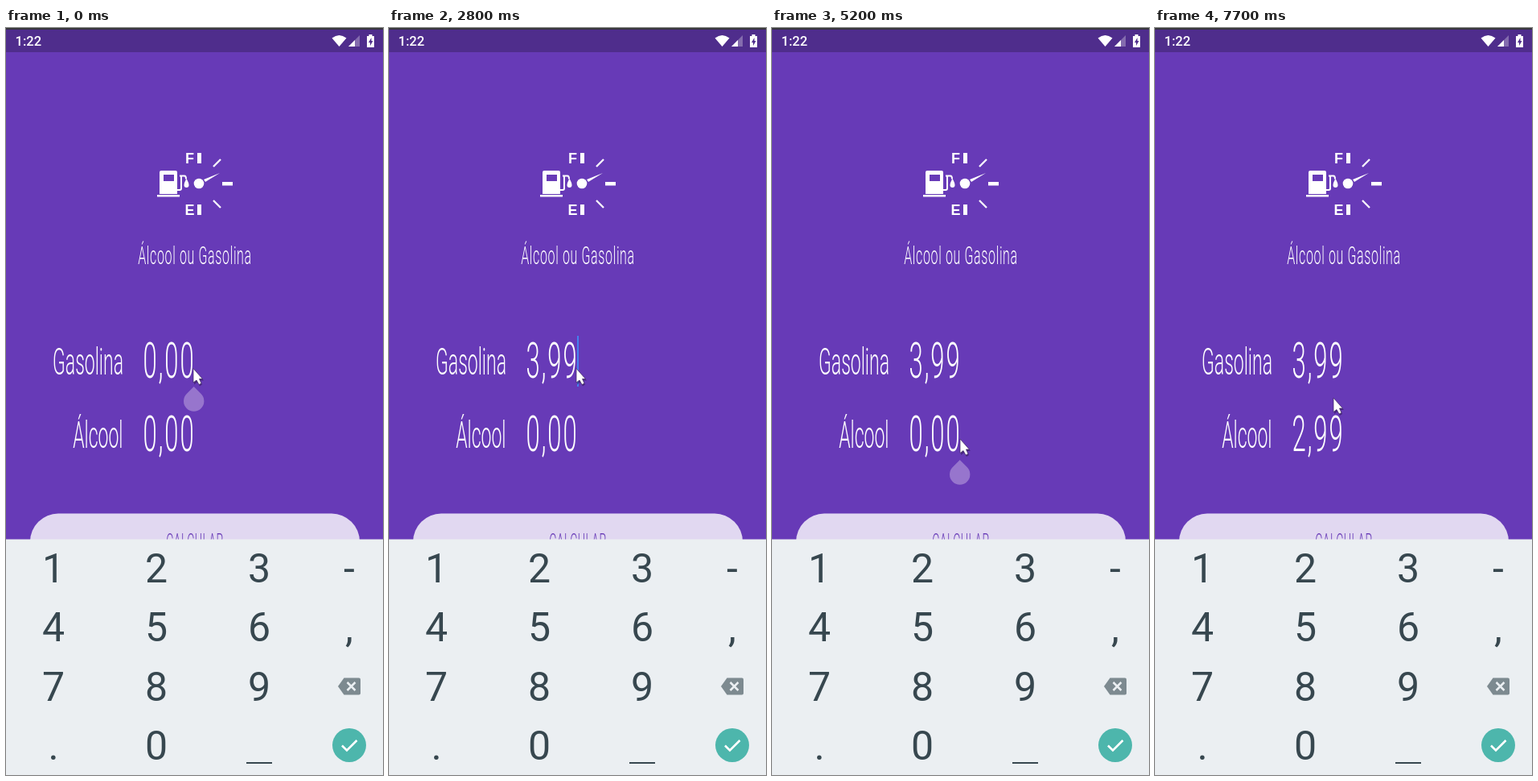
Write an HTML page that moves like this. It is 469 px wide and 927 px high and loops after 8000 ms.

```html
<!DOCTYPE html>
<html lang="pt-BR">
<head>
<meta charset="utf-8">
<style>
html, body { margin: 0; width: 100%; height: 100%; overflow: hidden; background: #673ab7; }
svg { display: block; width: 469px; height: 927px; }
text { font-family: Roboto, sans-serif; }
.thin text { font-weight: 300; fill: #fff; }
.value { font-size: 62px; letter-spacing: .06em; }
.label { font-size: 46px; text-anchor: end; }
.keys text { font-size: 50px; fill: #37474f; text-anchor: middle; }
.gauge text { font: bold 18px "Liberation Sans", sans-serif; }
</style>
</head>
<body>
<svg viewBox="0 0 469 927">
  <rect width="469" height="927" fill="#673ab7"/>
  <rect width="469" height="30" fill="#4f2d8c"/>
  <rect width="469" height="2" fill="#37363d"/>
  <g fill="#fff">
    <text x="11.500" y="22" font-size="16.500" font-weight="500">1:22</text>
    <path d="M405.500 12.500Q414.500 5.500 423.500 12.500L414.500 23Z"/>
    <path d="M426 23L440 9V23Z" opacity=".3"/>
    <path d="M426 23L434 15V23Z"/>
    <path d="M449 10h2.500V8h4v2h2.500v14h-9Z"/>
    <path d="M454.500 12l-3.500 6h2v4l3.500-6h-2Z" fill="#4f2d8c"/>
  </g>

  <g class="gauge" fill="#fff">
    <text x="223" y="168">F</text>
    <text x="222.500" y="231.500">E</text>
    <path d="M238 155h5v13h-5ZM238 219h5v13h-5ZM269 191h13v4.500h-13Z"/>
    <path d="M246 188L266 180L248 191Z"/>
    <circle cx="240" cy="193" r="6.300"/>
    <path d="M258 172l9-9M258 214l9 9" stroke="#fff" stroke-width="2.300"/>
    <path d="M193 177h18q2 0 2 2v27h-22v-27q0-2 2-2ZM188 207h28v2.500h-28Z"/>
    <rect x="196" y="182" width="13" height="8" fill="#673ab7"/>
    <path d="M213 201h3q2 0 2-2V183.500h4q2 0 2 4M216 183.500h4" fill="none" stroke="#fff" stroke-width="2"/>
    <path d="M224.500 187q3 5 3 8a3 3 0 0 1-6 0q0-3 3-8Z"/>
  </g>

  <!-- The display face is condensed to half width throughout -->
  <g class="thin">
    <text transform="translate(235 293) scale(.5 1)" font-size="32" letter-spacing=".04em" text-anchor="middle">Álcool ou Gasolina</text>
    <text class="label" transform="translate(146 429.500) scale(.5 1)">Gasolina</text>
    <text class="label" transform="translate(145.500 520.500) scale(.5 1)">Álcool</text>
    <text class="value" id="gas" transform="translate(170.500 434) scale(.5 1)"></text>
    <text class="value" id="alcohol" transform="translate(170.500 525) scale(.5 1)"></text>
    <rect x="30" y="602.500" width="410" height="70" rx="35" fill="#e1d8f1"/>
    <text transform="translate(235 647) scale(.5 1)" font-size="28" letter-spacing=".03em" text-anchor="middle" style="fill:#673ab7">CALCULAR</text>
  </g>

  <rect id="caret" x="234" width="2" height="63" fill="#4481f0"/>
  <path id="handle" d="M0 0L9 9A12.700 12.700 0 1 1-9 9Z" fill="#9775cd"/>
  <g id="pointer">
    <path d="M1 2V20L5 17L8 22L11 20L9 15H13Z" fill="#24113f" opacity=".45"/>
    <path d="M0 0V17.500L4 14.500L7 20L10 18.500L7.500 13H11.500Z" fill="#fff" stroke="#3b2560" stroke-width=".7"/>
  </g>

  <rect y="634.500" width="469" height="293" fill="#ebeff2"/>
  <g class="keys" id="keys"></g>
  <path d="M299 912h32" stroke="#37474f" stroke-width="2"/>
  <path d="M413 817l7.500-10.500h18.500q2 0 2 2v17q0 2-2 2h-18.500Z" fill="#7d8a90"/>
  <path d="M424.500 812l10 10m0-10l-10 10" stroke="#ebeff2" stroke-width="2.500"/>
  <circle cx="427" cy="890" r="21" fill="#4db6ac"/>
  <path d="M418 890.500l6 6 12.500-12.500" fill="none" stroke="#fff" stroke-width="2.600"/>
</svg>
<script>
const $ = id => document.getElementById(id);
const columns = [59, 187, 315, 427];
$('keys').innerHTML = ['123-', '456,', '789', '.0'].map((row, r) =>
  [...row].map((key, c) => `<text x="${columns[c]}" y="${688 + r * 73.4}">${key}</text>`).join('')
).join('');

const LOOP = 8000;
const blinks = [300, 800, 1200, 1700, 2800, 3000, 3600, 4100, 4700, 5100, 5700, 6100, 6500, 7600];
const gasTyping = [[0, '0,00'], [1800, '0,03'], [2100, '0,39'], [2800, '3,99']];
const alcoholTyping = [[0, '0,00'], [6500, '0,02'], [6900, '0,29'], [7300, '2,99']];
const valueAt = (steps, t) => steps.filter(step => step[0] <= t).pop()[1];

function pointerAt(t) {
  if (t < 4900) {
    const u = Math.min(1, Math.max(0, Math.floor((t - 3700) / 100) / 6));
    return [233 + 2 * u - 13 * Math.sin(Math.PI * u), 422.5 + 67.5 * u];
  }
  if (t < 5300) return [234, 510];
  return t < 5400 ? [240, 485] : [222, 459];
}

function setHandle(t) {
  const first = t < 400;
  const shown = first || (t >= 5100 && t < 6500);
  $('handle').setAttribute('transform', `translate(233.7 ${first ? 445 : 536})`);
  $('handle').setAttribute('opacity', shown ? (first && t >= 300 ? .5 : 1) : 0);
}

function draw(now) {
  const t = now % LOOP;
  $('gas').textContent = valueAt(gasTyping, t);
  $('alcohol').textContent = valueAt(alcoholTyping, t);
  $('caret').setAttribute('y', t < 4900 ? 382 : 473);
  $('caret').setAttribute('opacity', blinks.filter(b => b <= t).length % 2);
  $('pointer').setAttribute('transform', `translate(${pointerAt(t)})`);
  setHandle(t);
  requestAnimationFrame(draw);
}
draw(performance.now());
</script>
</body>
</html>
```
